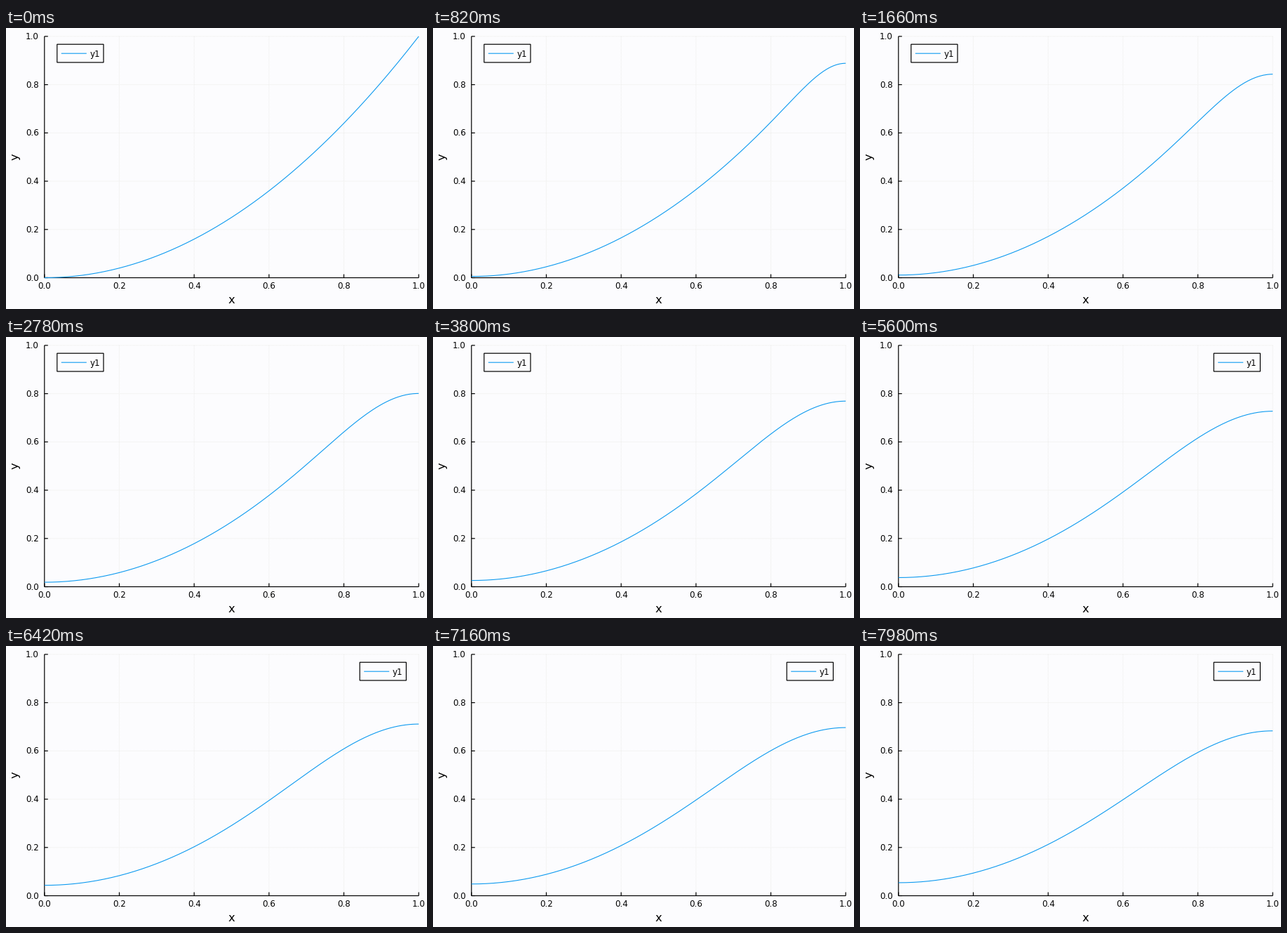
Recreate the animation shown at these times as a matplotlib script. Size 600 px wide and 400 px high, loop 8000 ms.

```python
import numpy as np
import matplotlib.pyplot as plt
from matplotlib.animation import FuncAnimation
from matplotlib.patches import Rectangle

W, H, DPI = 600, 400, 100
PX = 72 / DPI
LEFT, RIGHT, TOP, BOTTOM = 54.8, 588.2, 11.9, 355.5
PAPER, INK, GRID, BLUE = "#fcfcfe", "#000000", "#ededea", "#0c9af0"
INTERVAL, FRAMES = 20, 400
RATE = 1.58e-4  # diffusion per simulation step

plt.rcParams["font.family"] = "DejaVu Sans"
fig = plt.figure(figsize=(W / DPI, H / DPI), dpi=DPI, facecolor=PAPER)
ax = fig.add_axes([0, 0, 1, 1])
ax.set_xlim(0, W)
ax.set_ylim(H, 0)
ax.axis("off")


def px(x):
    return LEFT + (RIGHT - LEFT) * x


def py(y):
    return BOTTOM - (BOTTOM - TOP) * y


def stroke(xs, ys, color=INK, width=1.2, **kw):
    kw.setdefault("solid_capstyle", "butt")
    return ax.plot(xs, ys, color=color, lw=width * PX, snap=False, **kw)[0]


def label(x, y, s, size=8.6, **kw):
    return ax.text(x, y, s, fontsize=size, color=INK, va="baseline", **kw)


# Grid, ticks and tick labels
for v in np.arange(6) / 5:
    x, y = px(v), py(v)
    dots = dict(color=GRID, width=1, dashes=(1, 1), dash_capstyle="butt",
                zorder=1)
    stroke([x, x], [TOP, BOTTOM], **dots)
    stroke([LEFT, RIGHT], [y, y], **dots)
    stroke([x, x], [BOTTOM, BOTTOM - 5], zorder=2)
    stroke([LEFT, LEFT + 5], [y, y], zorder=2)
    label(x, 371, f"{v:.1f}", ha="center")
    label(47, y + 4, f"{v:.1f}", ha="right")

stroke([LEFT, RIGHT], [BOTTOM, BOTTOM], zorder=2)
stroke([LEFT, LEFT], [TOP, BOTTOM], zorder=2)
label(321.5, 391.5, "x", 11.7, ha="center")
label(17.5, 183.5, "y", 11.7, ha="center", rotation=90,
      rotation_mode="anchor")

# Heat equation with insulated ends, started from x squared
xs = np.linspace(0, 1, 201)
n = np.arange(1, 2001)
coef = 4 * (-1.0) ** n / (n * np.pi) ** 2
modes = np.cos(np.pi * np.outer(xs, n))


def heat(step):
    decay = np.exp(-(n * np.pi) ** 2 * RATE * step)
    return 1 / 3 + modes @ (coef * decay)


curve = stroke(px(xs), py(xs ** 2), BLUE, 1.1, zorder=3)

# Legend
box = ax.add_patch(Rectangle((72.8, 23.2), 66.2, 25.8, fc=PAPER, ec=INK,
                             lw=1.2 * PX, snap=False, zorder=4))
key = stroke([79, 115], [36.2, 36.2], BLUE, 1.1, zorder=5)
name = label(119.6, 40.5, "y1", zorder=5)


def place_legend(x):
    box.set_x(x)
    key.set_xdata([x + 6, x + 42])
    name.set_x(x + 46.8)


def step_at(i):
    # three steps per 140 ms, held for 20, 100 and 20 ms
    cycle, slot = divmod(i, 7)
    return 3 * cycle + (slot > 0) + (slot > 5)


def update(i):
    u = heat(step_at(i))
    curve.set_ydata(py(u))
    # the legend takes the top right corner once the curve leaves it
    place_legend(504.2 if u[-1] < 0.75 else 72.8)
    return curve, box, key, name


anim = FuncAnimation(fig, update, frames=FRAMES, interval=INTERVAL,
                     repeat=True, repeat_delay=0, blit=False)
plt.show()
```
